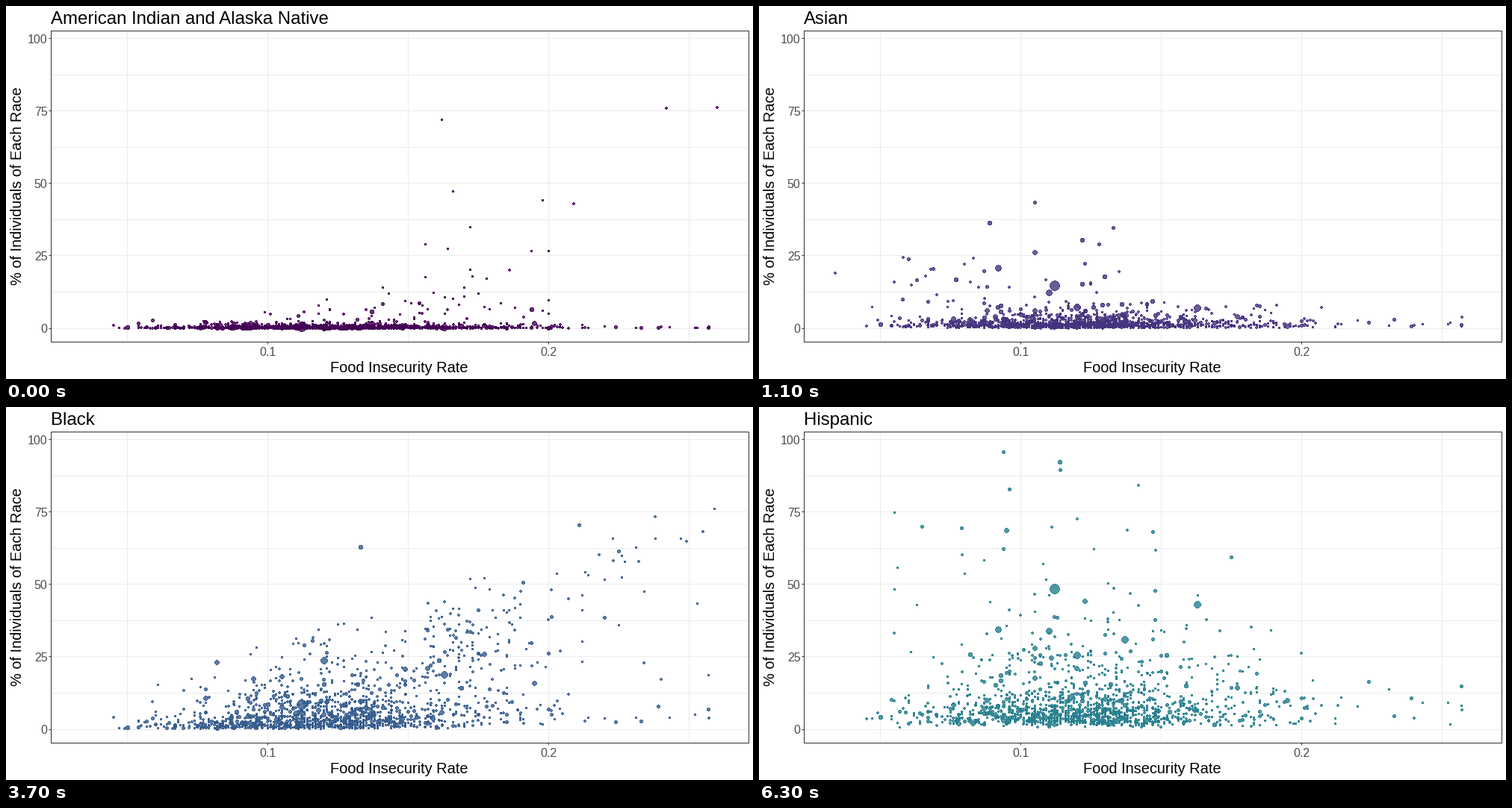
Animation, 1000 px wide and 500 px high, one loop 8000 ms. Source, as a matplotlib script:

```python
import numpy as np
import matplotlib.pyplot as plt
from matplotlib.animation import FuncAnimation

W, H, DPI = 1000, 500, 100
TICK_MS, LOOP_MS = 100, 8000
FIRST_MS, CYCLE_MS, STEP_MS, STEPS = 500, 2600, 200, 4
ALPHA = 0.8

TITLES = ["American Indian and Alaska Native", "Asian", "Black", "Hispanic"]
COLORS = ["#440154", "#46337E", "#365C8D", "#277F8E"]

# Largest counties: rate, diameter, then the share in each group
BIG = [
    (0.112, 14, 0.7, 14.9, 8.5, 48.6), (0.092, 9, 0.4, 20.8, 2.0, 34.4),
    (0.110, 9, 0.4, 12.3, 5.4, 34.0), (0.120, 10, 0.3, 7.4, 23.7, 25.7),
    (0.137, 10, 1.5, 4.4, 5.5, 31.1), (0.163, 10, 0.3, 7.2, 19.0, 43.0),
    (0.095, 7, 0.5, 3.0, 17.5, 68.7), (0.105, 7, 0.3, 26.2, 18.3, 28.0),
]

# Extreme counties of each group: rate, share, diameter
EXTREMES = [
    [(0.242, 76, 4), (0.26, 76.2, 4), (0.209, 43, 4), (0.198, 44.2, 3),
     (0.172, 35, 3)],
    [(0.105, 43.5, 5), (0.089, 36.5, 6), (0.133, 34.7, 5), (0.122, 30.4, 6),
     (0.034, 19.2, 4)],
    [(0.133, 63, 6), (0.259, 76.1, 3), (0.238, 73.4, 4), (0.211, 70.5, 5),
     (0.255, 68.4, 4)],
    [(0.094, 95.7, 5), (0.114, 92.4, 6), (0.114, 89.6, 5), (0.142, 84.4, 4),
     (0.096, 82.9, 5)],
]


def px(rate):
    return 350 + (rate - 0.1) * 3760


def py(pct):
    return 432 - 3.885 * pct


def lognormal(rng, median, sigma, size):
    return median * np.exp(sigma * rng.standard_normal(size))


def sizes(rng, n, base=2.7):
    return np.clip(np.round(base + rng.exponential(0.9, n)), 3, 7).astype(int)


def make_counties(rng):
    low = rng.normal(0.121, 0.028, 1280)
    low = low[(low > 0.053) & (low < 0.1495)]
    high = 0.15 + rng.exponential(0.025, 230)
    high = high[high < 0.22]
    ends = np.concatenate([rng.uniform(0.034, 0.052, 4),
                           rng.uniform(0.222, 0.26, 11)])
    rate = np.round(np.concatenate([low, high, ends]), 3)
    return rate, sizes(rng, rate.size)


def fold(values, cap):
    return np.where(values > cap, values % cap, values)


def make_shares(rng, rate, size):
    """Share of each group for the main mass of counties."""
    n = rate.size
    aian = 0.1 + np.minimum(lognormal(rng, 0.3, 1.0, n), 5)
    asian = 0.1 + fold(lognormal(rng, 1.3, 0.9, n) * size / 3.6, 9)
    black = 0.2 + lognormal(rng, 4, 1.2, n) * np.exp((rate - 0.12) * 12)
    black = fold(black, np.clip(30 + (rate - 0.1) * 280, 16, 45))
    hispanic = 0.8 + fold(lognormal(rng, 5.8, 0.9, n), 26)
    return aian, asian, black, hispanic


def make_tails(rng):
    """Scattered counties with an unusually high share: rate, share, size."""
    aian = np.clip(rng.normal(0.157, 0.022, 48), 0.058, 0.2)
    asian = rng.uniform(0.053, 0.148, 40)
    black = 0.155 + rng.exponential(0.03, 120)
    black = black[black < 0.25]
    hispanic = np.clip(rng.normal(0.121, 0.03, 95), 0.055, 0.2)
    rates = [aian, asian, black, hispanic]
    shares = [
        5 + rng.exponential(5 + np.maximum(aian - 0.13, 0) * 120),
        8 + rng.exponential(5.5, asian.size),
        np.clip(rng.normal(28 + (black - 0.155) * 400, 11), 2, 66),
        24 + rng.exponential(13, hispanic.size),
    ]
    bases = [2.3, 3.6, 2.8, 3.0]
    return [(r.round(3), np.minimum(s, 75), sizes(rng, r.size, b))
            for r, s, b in zip(rates, shares, bases)]


def dot(d):
    """Disc whose one-pixel rim counts twice, as fill and outline overlap."""
    i = np.arange(d) - (d - 1) / 2
    dist = np.hypot(i[:, None], i)
    disc = dist < d / 2 - 0.06
    return disc.astype(int) + (disc & (dist > d / 2 - 1.06))


DOTS = {d: dot(d) for d in range(3, 15)}


def count_layers(points):
    """How many coats of paint each stage pixel receives."""
    layers = np.zeros((H, W), int)
    for rate, share, d in points:
        left = int(round(px(rate) - (d - 1) / 2))
        top = int(round(py(share) - (d - 1) / 2))
        layers[top:top + d, left:left + d] += DOTS[d]
    return layers


def build_groups():
    rng = np.random.default_rng(12)
    rate, size = make_counties(rng)
    shares = make_shares(rng, rate, size)
    groups = []
    for g, tail in enumerate(make_tails(rng)):
        points = [*zip(rate, shares[g], size), *zip(*tail), *EXTREMES[g]]
        points += [(b[0], b[2 + g], b[1]) for b in BIG]
        groups.append(count_layers(points))
    return groups


def rgba(layers, color, alpha):
    img = np.empty((H, W, 4), np.uint8)
    img[..., :3] = [int(color[i:i + 2], 16) for i in (1, 3, 5)]
    img[..., 3] = np.round(255 * (1 - (1 - alpha) ** layers))
    return img


def ease(p):
    return 4 * p ** 3 if p < 0.5 else 1 - 4 * (1 - p) ** 3


def state(t):
    """Current group and how far it has faded into the next one."""
    if t < FIRST_MS:
        return 0, 0.0
    g, phase = divmod(t - FIRST_MS, CYCLE_MS)
    step = phase // STEP_MS + 1
    if step >= STEPS:
        return g + 1, 0.0
    return g, step / STEPS


plt.rcParams["font.family"] = "Liberation Sans"
fig = plt.figure(figsize=(W / DPI, H / DPI), dpi=DPI, facecolor="white")
ax = fig.add_axes([0, 0, 1, 1])
ax.axis("off")


def line(xs, ys, color, z):
    ax.plot(xs, ys, color=color, lw=72 / DPI, zorder=z, snap=False,
            solid_capstyle="butt", solid_joinstyle="miter")


def label(x, y, text, size, color="black", **kw):
    return ax.text(x, y, text, fontsize=size * 72 / DPI, color=color,
                   va="baseline", **kw)


def mid(v):
    """Centre of the pixel that holds v, so thin lines stay crisp."""
    return np.floor(v + 1e-6) + 0.5


LEFT, RIGHT, TOP, BOTTOM = 60.5, 994.5, 33.5, 450.5
GRID, DARK, GREY = "#EBEBEB", "#333333", "#4D4D4D"

for r in np.arange(0.05, 0.26, 0.05):
    line([mid(px(r))] * 2, [TOP, BOTTOM], GRID, 1)
for p in np.arange(0, 101, 12.5):
    line([LEFT, RIGHT], [mid(py(p))] * 2, GRID, 1)
for r in (0.1, 0.2):
    line([mid(px(r))] * 2, [BOTTOM, BOTTOM + 3], DARK, 3)
    label(px(r), 469, f"{r:.1f}", 16, GREY, ha="center")
for p in range(0, 101, 25):
    line([LEFT - 3, LEFT], [mid(py(p))] * 2, DARK, 3)
    label(55.5, py(p) + 6, str(p), 16, GREY, ha="right")
line([LEFT, RIGHT, RIGHT, LEFT, LEFT], [TOP, TOP, BOTTOM, BOTTOM, TOP], DARK, 3)

title = label(60, 24, TITLES[0], 24)
label(526.5, 491, "Food Insecurity Rate", 20, ha="center")
label(21.5, 241.5, "% of Individuals of Each Race", 20, ha="center",
      rotation=90, rotation_mode="anchor")

groups = build_groups()
images = [ax.imshow(rgba(layers, color, ALPHA), extent=(0, W, H, 0),
                    aspect="auto", interpolation="nearest", zorder=2)
          for layers, color in zip(groups, COLORS)]
ax.set_xlim(0, W)
ax.set_ylim(H, 0)


def update(i):
    g, p = state(i * TICK_MS)
    mix = ease(p)
    for k, image in enumerate(images):
        weight = {g: 1 - mix, g + 1: mix}.get(k, 0)
        image.set_visible(weight > 0)
        if weight > 0:
            image.set_data(rgba(groups[k], COLORS[k], ALPHA * weight))
    title.set_text(TITLES[g + (p > 0.5)])
    return images + [title]


anim = FuncAnimation(fig, update, frames=LOOP_MS // TICK_MS, interval=TICK_MS,
                     repeat=True, repeat_delay=0, blit=False)
plt.show()
```
